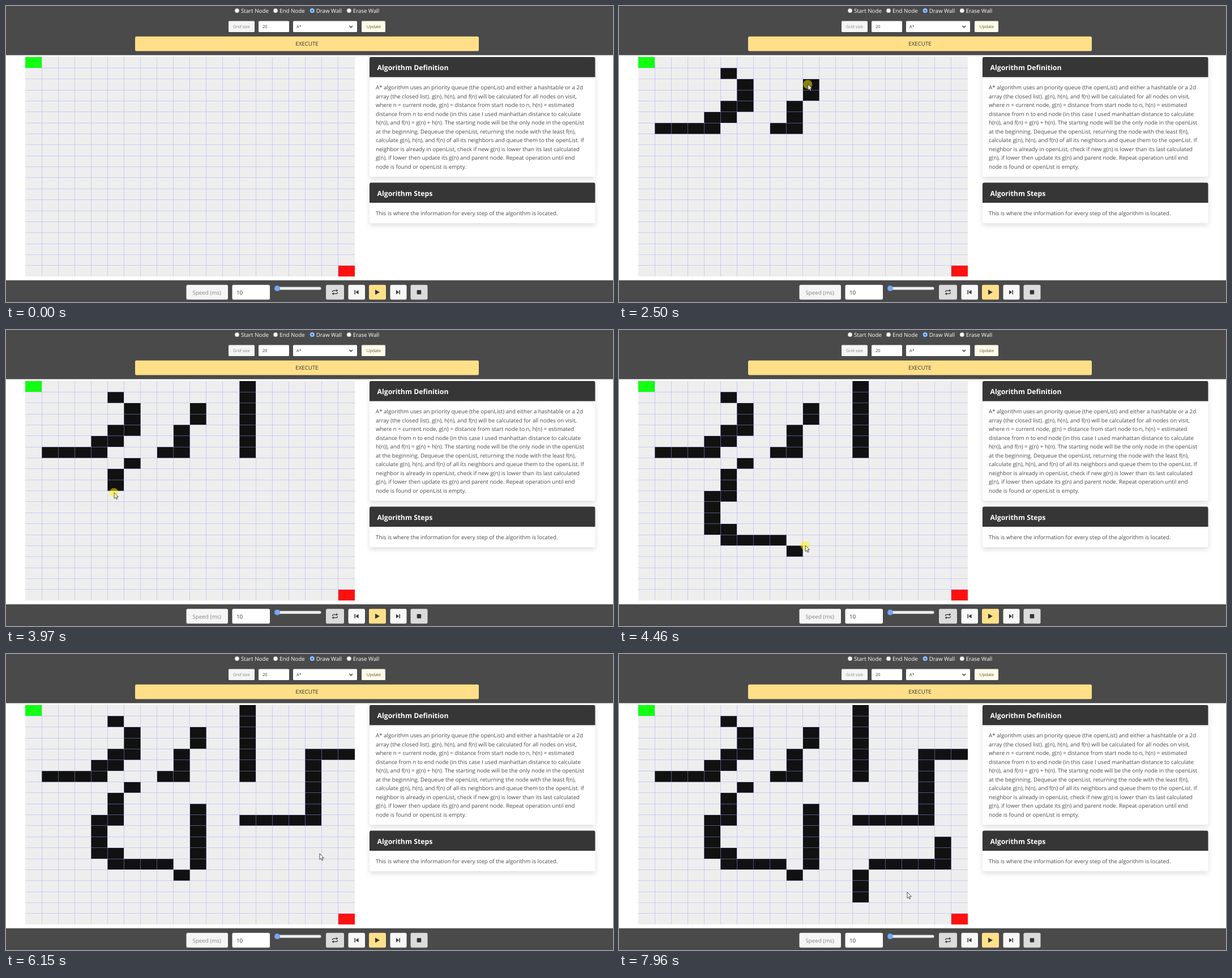
These frames come from a looping animation (1072 px wide and 522 px high, 8000 ms). An HTML page:

```html
<!DOCTYPE html>
<html lang="en">
<head>
<meta charset="utf-8">
<title>Pathfinding visualizer</title>
<style>
  html, body { margin: 0; width: 100%; height: 100%; overflow: hidden; background: #fff; }
  svg { display: block; width: 100%; height: 100%; }
  text { font: 9.76px "Open Sans", "Noto Sans", sans-serif; fill: #4a4a4a; text-rendering: geometricPrecision; }
  .title { font-size: 12.28px; font-weight: 700; fill: #fff; }
  .label { fill: #fff; }
  .small { font-size: 7.4px; }
  .muted { fill: #858585; }
  .dark { fill: #363636; }
  .card { filter: drop-shadow(0 4px 4px rgba(10, 10, 10, .13)); }
  .icon { fill: #333; }
</style>
</head>
<body>
<svg viewBox="0 0 1072 522" preserveAspectRatio="none">
  <rect width="1072" height="86.7" fill="#4a4a4a"/>
  <rect y="483.7" width="1072" height="39" fill="#4a4a4a"/>

  <g id="radios"></g>

  <rect x="393" y="26.5" width="46" height="19.4" rx="1.5" fill="#f5f5f5"/>
  <text class="small muted" x="401" y="39">Grid size</text>
  <rect x="446" y="26.5" width="54" height="19.4" rx="1.5" fill="#fff"/>
  <text class="small dark" x="453" y="39">20</text>
  <rect x="507" y="26.5" width="113" height="19.4" rx="1.5" fill="#fff"/>
  <text class="small dark" x="513" y="39">A*</text>
  <path d="M606.5 35l2.8 2.8 2.8-2.8" fill="none" stroke="#363636" stroke-width="1.5"/>
  <rect x="628" y="26.5" width="42" height="19.4" rx="1.5" fill="#fffbeb"/>
  <text class="small" x="636.8" y="39" style="fill:#5c5430">Update</text>

  <rect x="228" y="53.7" width="607" height="25.9" rx="2.5" fill="#ffdf88"/>
  <text class="dark" x="531.5" y="70.3" text-anchor="middle">EXECUTE</text>

  <rect x="34" y="90" width="582" height="387" fill="#eee"/>
  <g id="walls" fill="#111"></g>
  <path id="lines" fill="none" stroke="rgba(163,163,249,.466)"/>
  <rect x="34" y="90" width="29" height="19" fill="#1f1"/>
  <rect x="587" y="458" width="29" height="19" fill="#f11"/>

  <g class="card">
    <rect x="642" y="90" width="398.5" height="211" rx="3" fill="#fff"/>
    <path d="M642 125.5V93q0-3 3-3h392.5q3 0 3 3v32.5z" fill="#363636"/>
  </g>
  <text class="title" x="655.5" y="113">Algorithm Definition</text>
  <g id="definition"></g>

  <g class="card">
    <rect x="642" y="311.5" width="398.5" height="71.5" rx="3" fill="#fff"/>
    <path d="M642 347v-32.5q0-3 3-3h392.5q3 0 3 3v32.5z" fill="#363636"/>
  </g>
  <text class="title" x="655.5" y="334.6">Algorithm Steps</text>
  <text x="653" y="369">This is where the information for every step of the algorithm is located.</text>

  <rect x="318.5" y="491.8" width="73.5" height="25.9" rx="2.5" fill="#f5f5f5"/>
  <text class="muted" x="329.5" y="508.5">Speed (ms)</text>
  <rect x="399.5" y="491.8" width="66.5" height="25.9" rx="2.5" fill="#fff"/>
  <text class="dark" x="407" y="508.5">10</text>
  <rect x="475" y="495.5" width="81.5" height="5" rx="2.5" fill="#efefef"/>
  <circle cx="479" cy="498" r="5" fill="#74a6f6"/>

  <rect x="565" y="491.8" width="32" height="25.9" rx="2.5" fill="#dbdbdb"/>
  <rect x="604.5" y="491.8" width="29.5" height="25.9" rx="2.5" fill="#f8f8f8"/>
  <rect x="641" y="491.8" width="30" height="25.9" rx="2.5" fill="#ffe08a"/>
  <rect x="678.5" y="491.8" width="29" height="25.9" rx="2.5" fill="#f8f8f8"/>
  <rect x="714.5" y="491.8" width="30" height="25.9" rx="2.5" fill="#dbdbdb"/>
  <path d="M576.5 504.2q0-2.4 2.4-2.4h5M585.5 505q0 2.4-2.4 2.4h-5" fill="none" stroke="#333" stroke-width="1.2"/>
  <path class="icon" d="M583.3 499.4l3 2.4-3 2.4zM578.7 505l-3 2.4 3 2.4z"/>
  <path class="icon" d="M615.5 501h1.500v7.5h-1.500zM622.5 501v7.5l-5-3.75z"/>
  <path class="icon" d="M652 500.300l8 4.5-8 4.5z"/>
  <path class="icon" d="M689 501v7.5l5-3.75zM694.5 501h1.500v7.5h-1.500z"/>
  <rect class="icon" x="725.7" y="501" width="7.5" height="7.5" rx=".8"/>

  <g id="cursor">
    <circle id="press" cx="-.5" cy=".2" r="8" fill="#fff500" fill-opacity=".5"/>
    <path d="M0 0V10.5L2.4 8.3 4 12 5.7 11.3 4.1 7.7H7.3Z" fill="#fff" stroke="#222" stroke-width=".8"/>
  </g>
</svg>
<script>
const LOOP = 8000, STEP = 70, OFFSET = 50, HOLD = 60;
const SIZE = 20, CELL_W = 29.08, CELL_H = 19.36;
const gridX = c => 34 + CELL_W * c;
const gridY = r => 90 + CELL_H * r;
const byId = id => document.getElementById(id);

function add(parent, tag, attrs, text) {
  const el = document.createElementNS('http://www.w3.org/2000/svg', tag);
  for (const k in attrs) el.setAttribute(k, attrs[k]);
  if (text) el.textContent = text;
  return parent.appendChild(el);
}

function radio(x, name, on) {
  const g = byId('radios'), cx = x - 7;
  add(g, 'circle', { cx, cy: 8.2, r: 3.9, fill: '#fff', stroke: on ? '#2f7de8' : '#777', 'stroke-width': on ? 1 : .6 });
  if (on) add(g, 'circle', { cx, cy: 8.2, r: 2.3, fill: '#2f7de8' });
  add(g, 'text', { x, y: 12.2, class: 'label' }, name);
}
radio(415, 'Start Node');
radio(483, 'End Node');
radio(547.7, 'Draw Wall', true);
radio(612.8, 'Erase Wall');

`A* algorithm uses an priority queue (the openList) and either a hashtable or a 2d
array (the closed list). g(n), h(n), and f(n) will be calculated for all nodes on visit,
where n = current node, g(n) = distance from start node to n, h(n) = estimated
distance from n to end node (in this case I used manhattan distance to calculate
h(n)), and f(n) = g(n) + h(n). The starting node will be the only node in the openList
at the beginning. Dequeue the openList, returning the node with the least f(n),
calculate g(n), h(n), and f(n) of all its neighbors and queue them to the openList. If
neighbor is already in openList, check if new g(n) is lower than its last calculated
g(n), if lower then update its g(n) and parent node. Repeat operation until end
node is found or openList is empty.`
  .split('\n')
  .forEach((line, i) => add(byId('definition'), 'text', { x: 653, y: 147.2 + 15.53 * i }, line));

let d = '';
for (let i = 1; i < SIZE; i++) {
  d += `M${Math.floor(gridX(i)) + .5} 90V477M34 ${Math.floor(gridY(i)) + .5}H616`;
}
byId('lines').setAttribute('d', d);

const path = [], presses = [], walls = [];
const ARROWS = {
  '←': [-1, 0], '→': [1, 0], '↑': [0, -1], '↓': [0, 1],
  '↖': [-1, -1], '↗': [1, -1], '↙': [-1, 1], '↘': [1, 1]
};

const move = (time, x, y) => path.push({ time, x, y });

function addWall(c, r, time) {
  const x = Math.round(gridX(c)), y = Math.round(gridY(r));
  const width = Math.round(gridX(c + 1)) - x, height = Math.round(gridY(r + 1)) - y;
  walls.push({ time, el: add(byId('walls'), 'rect', { x, y, width, height }) });
}

// Walks from cell to cell; grip is where inside each cell the pointer passes
function drag({ from, to, cell: [c, r], walk, grip: [gx, gy], ease = 1 }) {
  const visit = i => {
    const time = from + (to - from) * (i / walk.length) ** (1 / ease);
    move(time, gridX(c + gx), gridY(r + gy));
    if (r >= 0) addWall(c, r, time);
  };
  visit(0);
  [...walk].forEach((arrow, i) => {
    c += ARROWS[arrow][0];
    r += ARROWS[arrow][1];
    visit(i + 1);
  });
  move(to + HOLD, gridX(c + gx), gridY(r + gy));
  presses.push([from, to + HOLD]);
}

move(OFFSET, 1009, 512);
drag({ from: 740, to: 1420, cell: [5, 1], walk: '↘↓↓←↓←↓←←←', grip: [.25, .55] });
move(1690, 78, 217);
drag({ from: 2020, to: 2440, cell: [8, 6], walk: '→↑↑↗↑', grip: [.31, .48] });
drag({ from: 2820, to: 3120, cell: [13, 6], walk: '↑'.repeat(7), grip: [.19, .82] });
move(3200, 417.5, 86.5);
move(3340, 327, 219);
drag({ from: 3620, to: 4390, cell: [6, 7], walk: '↙↓↓←↓↓↓→↓→→→↘', grip: [.4, .45], ease: 2 });
drag({ from: 4460, to: 4720, cell: [10, 14], walk: '↑'.repeat(5), grip: [.15, .98] });
move(5020, 401, 290);
drag({ from: 5100, to: 5800, cell: [13, 10], walk: '→→→→↑↑↑↑↑↑→→', grip: [.82, .5] });
move(6130, 554, 352);
move(6160, 554, 352);
drag({ from: 6330, to: 7530, cell: [18, 12], walk: '↓↓←←←←↙↓↓', grip: [.85, .2] });
move(7950, 509, 420);
move(LOOP, 509, 420);

function pointAt(t) {
  const i = Math.max(1, path.findIndex(p => p.time >= t));
  const a = path[i - 1], b = path[i];
  const k = (t - a.time) / (b.time - a.time);
  return [a.x + (b.x - a.x) * k, a.y + (b.y - a.y) * k];
}

const show = (el, on) => el.setAttribute('visibility', on ? 'visible' : 'hidden');

function render(time) {
  const t = Math.max(OFFSET, Math.floor((time - OFFSET) / STEP) * STEP + OFFSET);
  const visible = time >= STEP;
  const [x, y] = pointAt(t);
  byId('cursor').setAttribute('transform', `translate(${x.toFixed(2)} ${y.toFixed(2)})`);
  show(byId('cursor'), visible);
  show(byId('press'), visible && presses.some(([a, b]) => t >= a && t <= b));
  for (const wall of walls) show(wall.el, t > wall.time);
}

const start = performance.now();
function tick() {
  render((performance.now() - start) % LOOP);
  requestAnimationFrame(tick);
}
tick();
</script>
</body>
</html>
```
